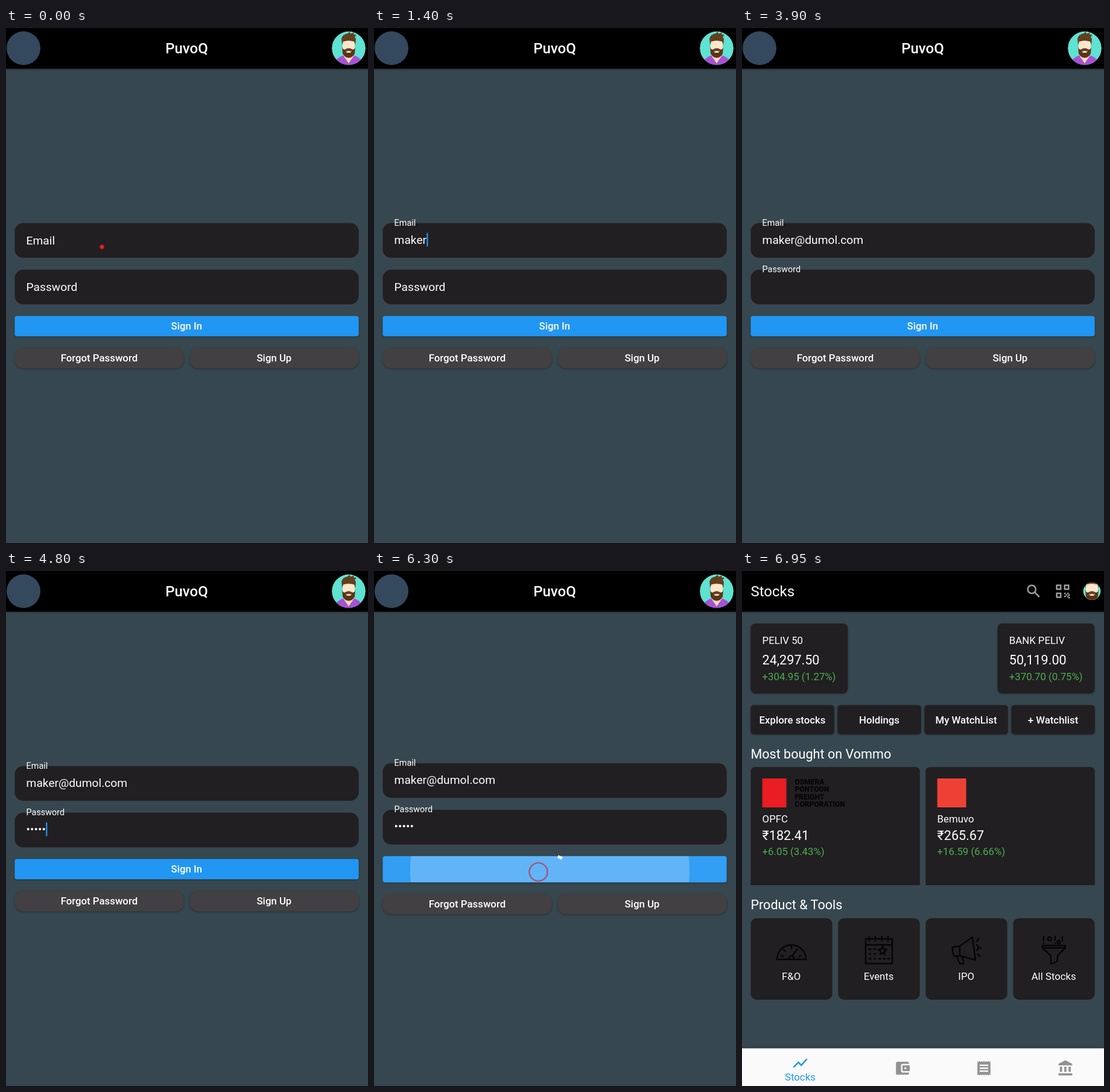
An HTML page for the animation above (8000 ms loop, 600 by 854 pixels).

```html
<!DOCTYPE html>
<html lang="en">
<head>
<meta charset="utf-8">
<title>Sign in</title>
<style>
  html, body { margin: 0; width: 100%; height: 100%; overflow: hidden; background: #37474f; }
  svg { display: block; width: 100%; height: 100%; }
  text { font-family: Roboto, sans-serif; fill: #fff; white-space: pre; }
  .raised { filter: drop-shadow(0 1.5px 1.5px rgba(0, 0, 0, .35)); }
  .tool { fill: none; stroke: #050505; stroke-width: 2.4; stroke-linecap: round; stroke-linejoin: round; }
</style>
</head>
<body>
<svg id="stage" viewBox="0 0 600 854"></svg>
<script>
const LOOP = 8000, STEP = 50;
const CARD = '#211f21', BLUE = '#2196f3', GREEN = '#4caf50';
const EMAIL = 'maker@dumol.com';
const emailKeys = [650, 950, 1100, 1250, 1400, 1800, 2050, 2250, 2350, 2450, 2600, 2850, 2950, 3050, 3250];
const passwordKeys = [4250, 4400, 4500, 4650, 4800];

const rect = (x, y, w, h, r = 0, fill = CARD, extra = '') =>
  `<rect x="${x}" y="${y}" width="${w}" height="${h}" rx="${r}" fill="${fill}" ${extra}/>`;
const text = (x, y, size, str, extra = '') =>
  `<text x="${x}" y="${y}" font-size="${size}" ${extra}>${str}</text>`;
const mid = (x, y, size, str, extra = '') => text(x, y, size, str, 'text-anchor="middle" ' + extra);
const strong = 'font-weight="500"';
const raised = 'class="raised"';
const icon = (cx, cy, path, fill = '#919191') =>
  `<path transform="translate(${cx - 14.4} ${cy - 14.4}) scale(1.2)" fill="${fill}" fill-rule="evenodd" d="${path}"/>`;

const header = rect(0, 0, 600, 67.5, 0, '#000', raised);

function avatar(cx, cy, r, id) {
  return `<clipPath id="${id}"><circle cx="${cx}" cy="${cy}" r="${r}"/></clipPath>
  <g clip-path="url(#${id})"><g transform="translate(${cx} ${cy})">
    <circle r="28" fill="#5fe2d2"/>
    <path d="M-24 28Q-22 16-9 12L9 12Q22 16 24 28Z" fill="#a653d3"/>
    <path d="M-9 12L0 25L9 12Z" fill="#fbd9b4"/>
    <path d="M-10-14H10V5Q0 12-10 5Z" fill="#fee6cb"/>
    <path d="M-11-3Q-10 3-6 2Q0-2 6 2Q10 3 11-3L10 9Q6 16 0 16Q-6 16-10 9Z" fill="#5a3418"/>
    <ellipse cy="5" rx="4.5" ry="2.6" fill="#fee6cb"/>
    <path d="M-4 5Q0 2 4 5" fill="none" stroke="#5a3418" stroke-width="2"/>
    <path d="M-11-5L-12-16Q-10-23-3-24L2-27L3-24L9-26L8-23L13-22L10-19L12-15L11-5L9-11Q0-14-9-11Z" fill="#62401f"/>
  </g></g>`;
}

function field(id, y, label) {
  return rect(14.4, y, 570.2, 57.5, 14) +
    text(33.6, 0, 19.2, label, `id="${id}Label"`) +
    text(33.6, y + 34.4, 19.2, '', `id="${id}Text"`) +
    rect(0, y + 16.2, 2.2, 22.6, 0, BLUE, `id="${id}Cursor"`);
}

function signInPage() {
  return rect(0, 0, 600, 854, 0, '#37474f') + header +
    '<circle cx="29" cy="33.5" r="28" fill="#34495e"/>' +
    mid(299.5, 42.3, 24, 'PuvoQ', strong) + avatar(568, 33.5, 28, 'face') +
    `<g id="fields">${field('email', 323.5, 'Email')}${field('password', 400.8, 'Password')}</g>
    <clipPath id="buttonClip">${rect(14.4, 472.6, 570.2, 43.8, 4)}</clipPath>` +
    rect(14.4, 477.5, 570.2, 33.8, 4, BLUE, 'id="button" ' + raised) +
    `<g clip-path="url(#buttonClip)">${rect(14.4, 472.6, 570.2, 43.8, 4, '#fff', 'id="tint"')}
      <circle id="ripple" cy="496" fill="#fff"/></g>` +
    mid(299.3, 500, 16.8, 'Sign In', 'id="signIn" ' + strong) +
    '<path id="spinner" fill="none" stroke="#fff" stroke-width="5"/>' +
    '<g id="links">' + [['Forgot Password', 14.4], ['Sign Up', 304.4]].map(([label, x]) =>
      rect(x, 530.3, 280.4, 34.2, 14.4, '#424042', raised) +
      mid(x + 140, 553, 16.8, label, strong)).join('') + '</g>' +
    '<circle id="touch"/>';
}

const indexCard = (x, name, value, change) =>
  rect(x, 87, 160.8, 116, 8, CARD, raised) + text(x + 19.2, 121, 16.8, name) +
  text(x + 19.2, 155, 21.6, value) + text(x + 19.2, 181, 16.8, change, `style="fill:${GREEN}"`);

const stockCard = (x, w, color, name, price, change) =>
  `<path d="M${x} 521V333q0-8 8-8h264.4q8 0 8 8V521Z" fill="${CARD}"/>` +
  rect(x + 19.2, 344, w, 48, 0, color) + text(x + 19.2, 417, 16.8, name) +
  text(x + 19.2, 446, 21.6, price) + text(x + 19.2, 471, 16.8, change, `style="fill:${GREEN}"`);

const dots = (xs, ys) => xs.flatMap(x => ys.map(y => `M${x} ${y}h2.5`)).join('');
const tools = [
  ['F&amp;O', 'M-24 16A24 24 0 1 1 24 16ZM-14 16h28M-17 10l3 1M-13 0l3 3M0-6v4M16 10l-3 1M1 10L10-1M-4 14a4 4 0 0 1 8 0'],
  ['Events', 'M-22-18H22V23H-22ZM-22-8H22M-16-22v7M-6-22v7M5-22v7M15-22v7M6-6l2 5 5 .5-4 3.500 1 5-4-3-4 3 1-5-4-3.500 5-.5Z' +
    dots([-16, -8], [-1, 7, 15]) + dots([0, 8, 15], [15])],
  ['IPO', 'M-23-4L-11-6V10L-20 11Q-24 4-23-4ZM-11-6L10-21L15 17L-11 10M-16 11l5 12h7l-3-12M17-8a5 5 0 0 1 0 9M17-14l4-5M20-3h4M18 7l5 4'],
  ['All Stocks', 'M-19-7H19L19-3L6 10V19L-5 24V10L-19-3ZM-19-3H19M-17-22v7M-17-11v.5M-7-21a3 3 0 1 1-.1 0M2-22v6M2-11v.5M8-15a2.500 2.500 0 1 1-.1 0M14-22v7']
];

function qrIcon() {
  const frame = (x, y) => rect(x, y, 6.5, 6.500, 0, 'none', 'stroke="#9e9e9e" stroke-width="2.5"');
  const bits = [[534, 36], [539, 36], [536.5, 38.5], [534, 41], [541, 38.5], [539, 41], [541, 43]];
  return frame(521.7, 23.7) + frame(534.8, 23.7) + frame(521.7, 37) +
    bits.map(([x, y]) => rect(x, y, 2.5, 2.5, 0, '#9e9e9e')).join('');
}

function stocksPage() {
  const chips = ['Explore stocks', 'Holdings', 'My WatchList', '+ Watchlist'];
  const wordmark = ['OSMERA', 'PONTOON', 'FREIGHT', 'CORPORATION'];
  return rect(0, 0, 600, 854, 0, '#37474f') + header + text(14.4, 42, 24, 'Stocks') +
    '<g fill="none" stroke="#9e9e9e" stroke-width="2.5"><circle cx="480.2" cy="30.4" r="6.6"/><path d="M485 35.200l7.800 7.800"/></g>' +
    qrIcon() + avatar(580, 33.5, 14.4, 'smallFace') +
    indexCard(14.4, 'PELIV 50', '24,297.50', '+304.95 (1.27%)') +
    indexCard(423.6, 'BANK PELIV', '50,119.00', '+370.70 (0.75%)') +
    chips.map((label, i) => rect(14.4 + i * 144, 222.4, 138.4, 48.4, 5, CARD, raised) +
      mid(83.5 + i * 144, 253, 16.8, label, strong)).join('') +
    text(14.4, 311, 21.6, 'Most bought on Vommo') +
    stockCard(14.4, 40, '#ea1c24', 'OPFC', '₹182.41', '+6.05 (3.43%)') +
    wordmark.map((word, i) => text(87.5, 354 + i * 12.4, 12, word, 'font-weight="900" style="fill:#050505"')).join('') +
    stockCard(304.4, 48, '#ee4136', 'Bemuvo', '₹265.67', '+16.59 (6.66%)') +
    text(14.4, 560.500, 21.6, 'Product &amp; Tools') +
    tools.map(([label, path], i) => {
      const x = 14.4 + i * 145;
      return rect(x, 575.7, 135.3, 135.2, 9.6, CARD) +
        `<path class="tool" transform="translate(${x + 67.5} 628)" d="${path}"/>` +
        mid(x + 67.3, 678, 16.8, label);
    }).join('') +
    rect(0, 791.5, 600, 62.5, 0, '#fafafa', 'style="filter:drop-shadow(0 -1px 2px rgba(0,0,0,.3))"') +
    icon(96.5, 816, 'M3.5 18.49l6-6.01 4 4L22 6.92l-1.41-1.41-7.09 7.97-4-4L2 16.99z', BLUE) +
    mid(96.4, 845, 16.8, 'Stocks', `style="fill:${BLUE}"`) +
    icon(266, 824.5, 'M21 18v1c0 1.1-.9 2-2 2H5c-1.11 0-2-.9-2-2V5c0-1.1.89-2 2-2h14c1.1 0 2 .9 2 2v1h-9c-1.11 0-2 .9-2 2v8c0 1.1.89 2 2 2h9zm-9-2h10V8H12v8zm4-2.5a1.5 1.5 0 1 1 0-3 1.5 1.5 0 0 1 0 3z') +
    icon(401, 824.5, 'M18 17H6v-2h12zm0-4H6v-2h12zm0-4H6V7h12zM3 22' + 'l1.5-1.5 1.5 1.5'.repeat(6) + 'V2' + 'l-1.5 1.5-1.5-1.5'.repeat(6) + 'z') +
    icon(536.5, 824.5, 'M4 10v7h3v-7zm6 0v7h3v-7zM2 22h19v-3H2zm14-12v7h3v-7zm-4.5-9L2 6v2h19V6z');
}

const stage = document.getElementById('stage');
stage.innerHTML = `<g>${signInPage()}</g><g id="stocks">${stocksPage()}</g>`;
const part = Object.fromEntries([...stage.querySelectorAll('[id]')].map(el => [el.id, el]));
const set = (id, attrs) => { for (const key in attrs) part[id].setAttribute(key, attrs[key]); };
const progress = (t, from, to) => Math.min(1, Math.max(0, (t - from) / (to - from)));
const smooth = p => p * p * (3 - 2 * p);
const mix = (a, b, p) => a + (b - a) * p;
const typed = (keys, t) => keys.filter(k => k <= t).length;

function drawField(id, y, value, float, cursorOn) {
  set(id + 'Label', { y: mix(y + 35.3, y + 4.5, float), 'font-size': mix(19.2, 14.4, float) });
  part[id + 'Text'].textContent = value;
  const width = value ? part[id + 'Text'].getComputedTextLength() : 0;
  set(id + 'Cursor', { x: 33.8 + width, visibility: cursorOn ? 'visible' : 'hidden' });
}

function drawTouch(t) {
  const second = t >= 5950;
  const p = second ? progress(t, 6070, 6550) : progress(t, 0, 500);
  const dot = p === 0;
  set('touch', {
    cx: second ? 272.5 : 159, cy: second ? 499 : 363, r: dot ? 3.6 : 4 + 23 * p,
    fill: dot ? '#e8211d' : 'none', stroke: dot ? '#8b1a1a' : '#c4283c',
    'stroke-width': dot ? 1.2 : 2.6, opacity: dot ? 1 : 1.2 * (1 - p)
  });
}

function drawButton(t) {
  const loading = t >= 6200;
  const shift = loading ? 4.8 : 0;
  set('fields', { transform: `translate(0 ${-shift})` });
  set('links', { transform: `translate(0 ${shift})` });
  set('button', { y: 477.5 - shift, height: 33.8 + 2 * shift + (loading ? .4 : 0) });
  part.buttonClip.firstElementChild.setAttribute('y', 477.5 - shift);
  part.buttonClip.firstElementChild.setAttribute('height', 33.8 + 2 * shift);
  set('signIn', { visibility: loading ? 'hidden' : 'visible' });
  set('tint', { opacity: .08 * progress(t, 5950, 6100) });
  const spread = progress(t, 6070, 6390);
  set('ripple', { cx: mix(272, 299, spread), r: 322 * spread, opacity: mix(.23, .065, progress(t, 6350, 6650)) });

  const tail = (-76 + .16 * (t - 6300)) * Math.PI / 180;
  const sweep = 1.5 * Math.PI * smooth(progress(t, 6193, 6832));
  const point = a => `${299.5 + 21.6 * Math.cos(a)} ${494.6 + 21.6 * Math.sin(a)}`;
  set('spinner', {
    visibility: loading ? 'visible' : 'hidden',
    d: `M${point(tail)}A21.6 21.6 0 ${sweep > Math.PI ? 1 : 0} 1 ${point(tail + sweep)}`
  });
}

function draw(time) {
  const t = Math.floor(time / STEP) * STEP;
  const still = Math.min(t, 6650);
  drawField('email', 323.5, EMAIL.slice(0, typed(emailKeys, t)),
    smooth(progress(t, 130, 300)), t >= 150 && t < 3450);
  const blink = (t >= 3900 && t < 4250) || (t >= 5300 && t < 5800);
  drawField('password', 400.8, '•'.repeat(typed(passwordKeys, t)),
    smooth(progress(t, 3420, 3600)), t >= 3450 && t < 5950 && !blink);
  drawTouch(still);
  drawButton(still);
  set('stocks', { opacity: t < 6850 ? 0 : t < 6900 ? .35 : t < 6950 ? .75 : 1 });
}

function tick() {
  draw(performance.now() % LOOP);
  requestAnimationFrame(tick);
}
tick();
</script>
</body>
</html>
```
